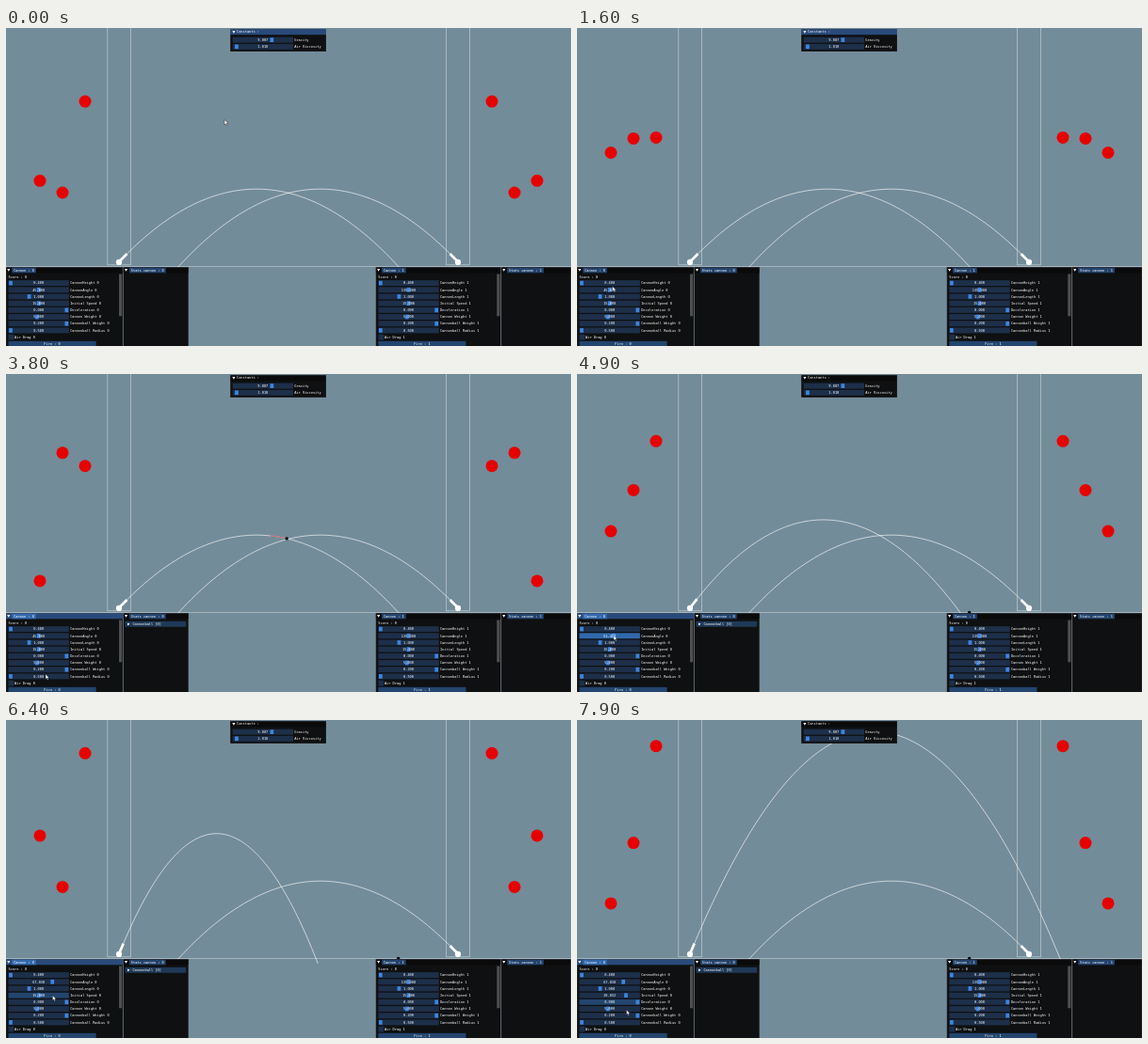
These frames come from a looping animation (600x338 px, 8000 ms). An HTML page with a canvas:

```html
<!DOCTYPE html>
<html lang="en">
<head>
<meta charset="utf-8">
<title>Cannon sandbox</title>
<style>
  html, body { margin: 0; width: 100%; height: 100%; overflow: hidden; background: #738c99; }
  canvas { display: block; width: 600px; height: 338px; }
</style>
</head>
<body>
<canvas id="stage"></canvas>
<script>
const LOOP = 8000, STEP = 100;
const UI = 0.3125;            // panels are laid out for a 1920 px wide screen
const METRE = 12, GRAVITY = 9.807 * METRE, GROUND = 253.3;
const FIRE = 2467, FOCUS = 2400;

const canvas = document.getElementById('stage');
const ctx = canvas.getContext('2d');
const dpr = window.devicePixelRatio || 1;
canvas.width = 600 * dpr;
canvas.height = 338 * dpr;

const color = {
  back: '#738c99', panel: '#0f1011', title: '#0a0a0a', titleOn: '#294a7a',
  tab: '#23436c', tabOn: '#3369ad', frame: '#1d2f49', frameHover: '#23456e',
  frameActive: '#3169ad', grab: '#3d85e0', grabActive: '#4296fa',
  button: '#23456e', header: '#1f3957', scroll: '#4f4f4f', text: '#fff'
};

// time, x, y of the pointer tip
const pointerKeys = [
  [0, 232, 97.5], [300, 232, 97.5], [1500, 70, 264], [1600, 37.5, 274.5],
  [1900, 39, 280], [2300, 47, 335.5], [2900, 47.5, 335.5], [3700, 45, 327],
  [3800, 42, 319], [4500, 34.7, 278], [4600, 34.7, 278], [4900, 38.93, 277.7],
  [5600, 49.221, 278], [6300, 49.4, 292.5], [6500, 49.5, 293], [7100, 52, 293],
  [7600, 52, 293], [7800, 52.2, 301], [7900, 52.5, 308]
];

// base height, speed in px/s, time of the lowest point on screen
const targets = [
  { x: 36, top: 109, speed: 48, low: 3610 },
  { x: 60, top: 61, speed: 36, low: 6500 },
  { x: 84, top: 13.5, speed: 24, low: 2310 }
];
const SWING = 120;

const labels = ['CannonHeight', 'CannonAngle', 'CannonLength', 'Initial Speed',
  'Deceleration', 'Cannon Weight', 'Cannonball Weight', 'Cannonball Radius'];

function pointer(t) {
  let i = 0;
  while (i < pointerKeys.length - 2 && pointerKeys[i + 1][0] <= t) i++;
  const [t0, x0, y0] = pointerKeys[i], [t1, x1, y1] = pointerKeys[i + 1];
  const k = Math.max(0, Math.min(1, (t - t0) / (t1 - t0)));
  return { x: x0 + (x1 - x0) * k, y: y0 + (y1 - y0) * k };
}

const dragFraction = t => (pointer(t).x / UI - 16) / 190;
const angleAt = t => t < 4600 ? 45 : 90 * dragFraction(Math.min(t, 5600));
const speedAt = t => t < 6500 ? 15 : 5 + 20 * dragFraction(Math.min(t, 7100));

function targetY(o, t) {
  const period = 2 * SWING / o.speed * 1000;
  const phase = (((t - o.low) / period) % 1 + 1) % 1;
  return o.top + SWING * Math.abs(1 - 2 * phase);
}

function muzzle(x, deg) {
  const a = deg * Math.PI / 180;
  return { x: x + METRE * Math.cos(a), y: 248.5 - METRE * Math.sin(a) };
}

function flight(x, deg, speed, s) {
  const a = deg * Math.PI / 180, m = muzzle(x, deg), v = speed * METRE;
  return { x: m.x + v * Math.cos(a) * s, y: m.y - v * Math.sin(a) * s + GRAVITY * s * s / 2 };
}

function rect(x, y, w, h, fill) {
  ctx.fillStyle = fill;
  ctx.fillRect(x, y, w, h);
}

function disc(x, y, r, fill) {
  ctx.fillStyle = fill;
  ctx.beginPath();
  ctx.arc(x, y, r, 0, Math.PI * 2);
  ctx.fill();
}

function line(points, stroke, width) {
  ctx.strokeStyle = stroke;
  ctx.lineWidth = width;
  ctx.beginPath();
  points.forEach(p => ctx.lineTo(p.x, p.y));
  ctx.stroke();
}

function shape(points, fill) {
  ctx.fillStyle = fill;
  ctx.beginPath();
  points.forEach(p => ctx.lineTo(p[0], p[1]));
  ctx.closePath();
  ctx.fill();
}

function text(s, x, mid, align = 'left') {
  ctx.fillStyle = color.text;
  ctx.textAlign = align;
  ctx.fillText(s, x, mid + 4);
}

function cannon(x, deg, speed) {
  const path = [];
  for (let s = 0; s < 6; s += 0.02) {
    const p = flight(x, deg, speed, s);
    path.push(p);
    if (p.y > 256.5) break;
  }
  line(path, 'rgba(255,255,255,.85)', 0.75);
  line([{ x, y: 248.5 }, muzzle(x, deg)], '#fff', 2.7);
  disc(x, 248.9, 3.1, '#fff');
}

function ball(t) {
  if (t < FIRE) return;
  const at = ms => {
    const s = Math.min(2.264, Math.max(0, (ms - FIRE) / 1000));
    return flight(120, 45, 15, s);
  };
  const trail = [];
  for (let d = 140; d >= 0; d -= 10) trail.push(at(t - d));
  line(trail, '#c24a50', 0.8);
  const p = at(t);
  disc(p.x, p.y, 1.7, '#000');
}

function scene(t) {
  rect(0, 0, 600, 338, color.back);
  ctx.strokeStyle = 'rgba(255,255,255,.55)';
  ctx.lineWidth = 0.7;
  for (const x of [107.8, 467.6]) ctx.strokeRect(x, -5, 24.8, 256.8);
  line([{ x: 0, y: 253.5 }, { x: 600, y: 253.5 }], 'rgba(255,255,255,.5)', 0.7);
  for (const o of targets) {
    const y = targetY(o, t);
    disc(o.x, y, 6.5, '#e60000');
    disc(600 - o.x, y, 6.5, '#e60000');
  }
  cannon(120, angleAt(t), speedAt(t));
  cannon(480, 135, 15);
  ball(t);
}

function panel(x, y, w, h, titleFill) {
  rect(x, y, w, h, color.panel);
  rect(x, y, w, 19, titleFill);
  ctx.strokeStyle = 'rgba(110,110,128,.5)';
  ctx.lineWidth = 1;
  ctx.strokeRect(x + 0.5, y + 0.5, w - 1, h - 1);
}

function arrowDown(x, mid) {
  shape([[x - 5, mid - 4], [x + 5, mid - 4], [x, mid + 5]], color.text);
}

function slider(x, y, value, frac, label, state = 0) {
  rect(x, y, 206, 19, [color.frame, color.frameHover, color.frameActive][state]);
  rect(x + 2 + 190 * frac, y + 2, 12, 15, state === 2 ? color.grabActive : color.grab);
  text(value.toFixed(3), x + 103, y + 9.5, 'center');
  text(label, x + 210, y + 9.5);
}

function dockTab(x, title, focused) {
  arrowDown(x + 9, 823);
  rect(x + 20, 815, title.length * 7 + 12, 18, focused ? color.tabOn : color.tab);
  text(title, x + 26, 824);
}

function cannonPanel(x, w, id, values, fracs, ui) {
  panel(x, 814, w, 270, ui.focused ? color.titleOn : color.title);
  dockTab(x, 'Cannon : ' + id, ui.focused);
  text('Score : 0', x + 8, 847.5);
  const rowY = i => 858 + 23 * i;
  labels.forEach((label, i) => {
    const state = i === ui.active ? 2 : i === ui.hover ? 1 : 0;
    slider(x + 8, rowY(i), values[i], fracs[i], label + ' ' + id, state);
  });
  rect(x + 8, rowY(8), 19, 19, color.frame);
  text('Air Drag ' + id, x + 29, rowY(8) + 9.5);
  rect(x + 8, rowY(9), 298, 19, ui.hover === 9 ? color.grabActive : color.button);
  text('Fire : ' + id, x + 157, rowY(9) + 9.5, 'center');
  rect(x + w - 13, 837, 10, 143, color.scroll);
}

function statsPanel(x, w, id, hasBall) {
  panel(x, 814, w, 270, color.title);
  dockTab(x, 'Stats cannon : ' + id, false);
  if (!hasBall) return;
  rect(x + 6, 841, w - 14, 19, color.header);
  shape([[x + 14, 846], [x + 14, 855], [x + 22, 850.5]], color.text);
  text('Cannonball [0]', x + 31, 850.5);
}

function hoveredRow(t) {
  const p = pointer(t - STEP);
  const x = p.x / UI, y = p.y / UI - 858, row = Math.floor(y / 23);
  if (y < 0 || y - row * 23 > 19 || x < 8) return -1;
  return x < (row === 9 ? 306 : 214) ? row : -1;
}

function panels(t) {
  const focused = t >= FOCUS;
  const angle = angleAt(t), speed = speedAt(t);
  const active = t >= 4600 && t <= 5600 ? 1 : t >= 6500 && t <= 7100 ? 3 : -1;
  const hover = active < 0 ? hoveredRow(t) : -1;

  ctx.save();
  ctx.scale(UI, UI);
  ctx.font = '11.63px "DejaVu Sans Mono", monospace';

  panel(762, 4, 326, 76, focused ? color.title : color.titleOn);
  arrowDown(774, 13.5);
  text('Constants :', 784, 13.5);
  slider(770, 31, 9.807, 0.66, 'Gravity');
  slider(770, 54, 1.010, 0.03, 'Air Viscosity');

  const values = (a, v) => [0.4, a, 1, v, 0, 5, 0.2, 0.5];
  const fracs = (a, v) => [0, a, 0.33, v, 1, 0.47, 1, 0];
  cannonPanel(0, 397, 0, values(angle, speed), fracs(angle / 90, (speed - 5) / 20),
    { focused, active, hover });
  statsPanel(399, 221, 0, t >= FIRE);
  cannonPanel(1257, 424, 1, values(135, 15), fracs(0.5, 0.5),
    { focused: false, active: -1, hover: -1 });
  statsPanel(1683, 237, 1, false);
  ctx.restore();
}

function drawPointer(t) {
  const p = pointer(t);
  ctx.save();
  ctx.translate(p.x, p.y);
  ctx.scale(UI, UI);
  shape([[0, 0], [0, 17], [4, 13.5], [7, 20], [10, 18.5], [7, 12.5], [12, 12]], '#fff');
  ctx.strokeStyle = '#000';
  ctx.lineWidth = 1.2;
  ctx.stroke();
  ctx.restore();
}

function draw(t) {
  ctx.setTransform(dpr, 0, 0, dpr, 0, 0);
  scene(t);
  panels(t);
  drawPointer(t);
}

const start = performance.now();
function tick() {
  const t = (performance.now() - start) % LOOP;
  draw(Math.floor(t / STEP) * STEP);
  requestAnimationFrame(tick);
}
tick();
</script>
</body>
</html>
```
